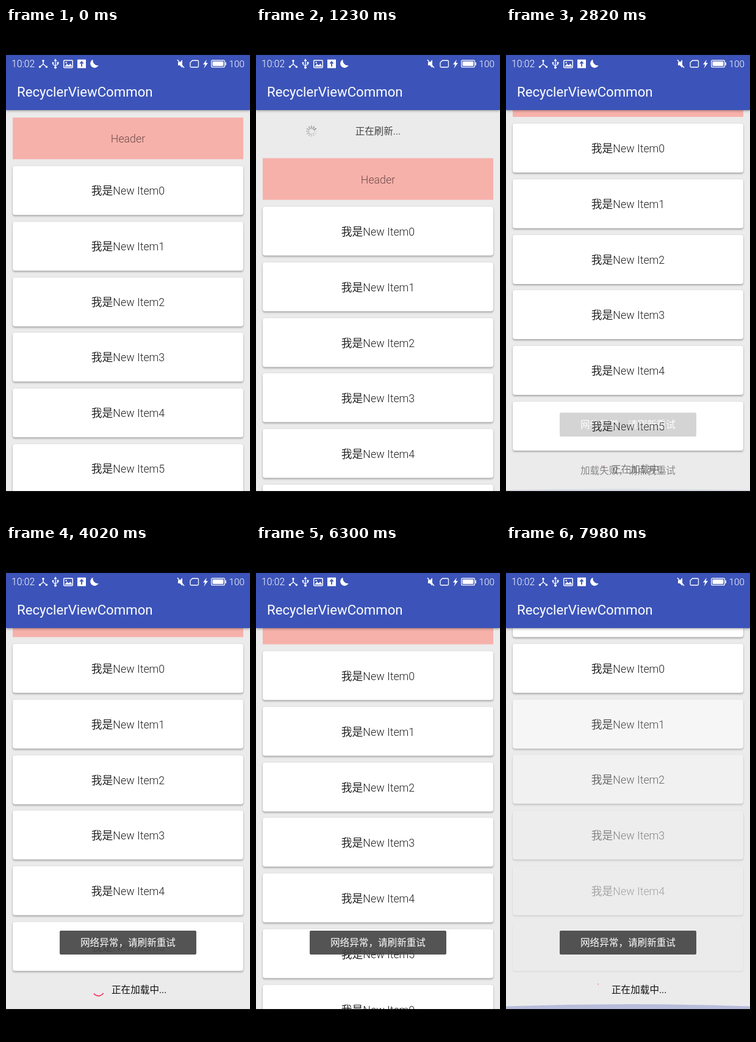
An HTML page that plays this animation: 400x800 px, repeating every 8000 ms.

```html
<!DOCTYPE html>
<html lang="zh-CN">
<head>
<meta charset="utf-8">
<title>RecyclerViewCommon</title>
<style>
html, body { margin: 0; width: 100%; height: 100%; overflow: hidden; background: #000; }
body { position: relative; font-family: Roboto, "Noto Sans CJK SC", "Noto Sans CJK", sans-serif; }
div, svg { position: absolute; }
#stage { left: 0; top: 0; width: 400px; height: 800px; overflow: hidden; background: #000; }
#view { top: 134px; width: 400px; height: 622px; overflow: hidden; background: #ebebeb; }
#roll { top: -134px; width: 400px; height: 800px; }
#bar { top: 44px; width: 400px; height: 90px; background: #3c54b9; box-shadow: 0 1px 4px rgba(0,0,0,.4); }
#clip { top: 44px; width: 400px; height: 712px; overflow: hidden; }
.label { height: 20px; line-height: 20px; white-space: pre; }
.mid { left: 0; width: 400px; text-align: center; }
.card { left: 11px; width: 378px; height: 80px; border-radius: 4px; background: #fff;
  box-shadow: 0 2px 3px rgba(0,0,0,.28), 0 0 2px rgba(0,0,0,.13); }
.card .label { top: 31px; left: 0; width: 378px; text-align: center; font-size: 17.8px; font-weight: 300; color: #222; }
#header { left: 11px; top: 146px; width: 377.5px; height: 68px; background: #f7b1ab; }
#toast { left: 88px; top: 628px; width: 224px; height: 39px; border-radius: 2px; background: rgba(70,70,70,.92); }
svg { left: 0; top: 0; overflow: visible; }
</style>
</head>
<body>
<div id="stage">
  <div id="view"><div id="roll">
    <div id="header"></div>
    <div id="pull">
      <svg width="400" height="200">
        <g id="arrow" fill="#b8b8b8">
          <path d="M91 86L99 94.500H95V97H87V94.500H83Z"/>
          <path d="M87 98.500h8v3h-8z" opacity=".8"/>
          <path d="M87 103h8v2.500h-8z" opacity=".6"/>
          <path d="M87 107h8v2h-8z" opacity=".4"/>
          <path d="M87 111h8v2h-8z" opacity=".2"/>
        </g>
        <g id="spokes" stroke-width="1.6" stroke-linecap="round"></g>
      </svg>
    </div>
    <div id="foot"><div id="loading">
      <svg width="400" height="20"><circle id="ring" r="9.5" fill="none" stroke="#ee406c" stroke-width="1.8" pathLength="360"/></svg>
    </div></div>
  </div></div>
  <svg id="edge" width="400" height="756"><path id="glow" fill="#3f51b5"/></svg>
  <div id="clip" style="height:98px"><div id="bar" style="top:0"></div></div>
  <div id="status">
    <svg width="400" height="80" fill="none" stroke="#fff" stroke-width="1.5">
      <path d="M61 53v6l-5 4M61 59l5 4"/>
      <g fill="#fff" stroke="none">
        <circle cx="61" cy="53.500" r="1.700"/><circle cx="55.500" cy="63.500" r="1.700"/><circle cx="66.500" cy="63.500" r="1.700"/>
        <path d="M81 50l2.500 4h-5z"/><circle cx="81" cy="64.500" r="2"/><circle cx="77" cy="57" r="1.500"/><path d="M83.500 55.500h3v3h-3z"/>
        <path d="M117 51.500h14v14h-14z"/>
        <path d="M141.500 52a7 7 0 1 0 9 9.500a8 8 0 0 1-9-9.500z" transform="translate(1 -.5)"/>
        <path d="M282 56h3l4-4v13l-4-4h-3z"/>
        <path d="M329 51.500l-6 8h3.500l-2 6.500 6.500-9h-3.500z"/>
        <rect x="338.500" y="54.500" width="18" height="7.500" rx="1"/><path d="M359.500 56h1.500v5h-1.500z"/>
      </g>
      <path d="M77 57v2.500l4 2.500M81 53v11M85 58v1.500l-4 2" stroke-width="1.200"/>
      <rect x="94.700" y="52.700" width="14.500" height="12" rx="1"/>
      <path d="M96 63l4-4.500 3 2.500 2.500-3 3 5z" fill="#fff" stroke="none"/><circle cx="98.700" cy="56.500" r="1.200" fill="#fff" stroke="none"/>
      <path d="M124 63v-7M121.300 58l2.700-3 2.700 3" stroke="#3c54b9" stroke-width="1.800"/>
      <path d="M281 52l11 13"/>
      <path d="M305.500 53h8.500q1.500 0 1.500 1.500v8q0 1.500-1.500 1.500h-10.500q-1.500 0-1.500-1.500v-6z" stroke-width="1.300"/>
      <rect x="336.700" y="52.700" width="21.800" height="11.200" rx="2" stroke-width="1.200"/>
    </svg>
  </div>
  <div id="toast"></div>
</div>
<script>
const LOOP = 8000, PITCH = 90.8, BATCH = 6, SPOKES = 12;
const $ = id => document.getElementById(id);

function label(parent, text, x, y, size, color, weight = 400) {
  const el = document.createElement('div');
  el.className = x === null ? 'label mid' : 'label';
  el.textContent = text;
  Object.assign(el.style, { top: y - 10 + 'px', fontSize: size + 'px', color, fontWeight: weight });
  if (x !== null) el.style.left = x + 'px';
  parent.append(el);
  return el;
}

label($('status'), '10:02', 9, 58.5, 15.8, '#fff', 300);
label($('status'), '100', 365.5, 58.5, 15.4, '#fff', 300);
label($('status'), 'RecyclerViewCommon', 18, 104, 22.2, '#fff');

const headText = label($('header'), 'Header', null, 35, 17.8, '#6f4a48', 300);
headText.style.width = '378px';
const pullText = label($('pull'), '', null, 91, 15.5, '#444');
const pullTime = label($('pull'), '最近更新 : 10:02', null, 113, 13.4, '#444');
label($('loading'), '正在加载中...', 173, 790.3, 15.6, '#111');
const failed = label($('foot'), '加载失败，请点我重试', null, 792, 15.6, '#222');
const toastText = label($('toast'), '网络异常，请刷新重试', null, 20, 15.6, '#fff');
toastText.style.width = '224px';

const cards = Array.from({ length: BATCH * 2 }, (_, i) => {
  const el = document.createElement('div');
  el.className = 'card';
  el.style.top = 225 + i * PITCH + 'px';
  label(el, '我是New Item' + i % BATCH, null, 0, 17.8, '').removeAttribute('style');
  $('roll').append(el);
  return el;
});

const spokes = Array.from({ length: SPOKES }, (_, i) => {
  const line = document.createElementNS('http://www.w3.org/2000/svg', 'path');
  line.setAttribute('d', 'M0-4.5V-8.5');
  line.setAttribute('stroke', '#777');
  line.setAttribute('transform', `translate(91 102) rotate(${i * 360 / SPOKES})`);
  $('spokes').append(line);
  return line;
});

// Keys are [time, value, ease-out power].
const scrollKeys = [
  [0, 0], [720, 113, 1.5], [840, 113], [1110, 66.5, 2.5], [1900, 66.5], [2200, 0, 2],
  [2280, 0], [2500, -65.3, 1.3], [2700, -65.3], [2760, -68.9], [3600, -68.9], [3700, -65.3],
  [6030, -65.3], [6650, -48, 2], [7350, -48], [7440, -64], [7500, -110], [7850, -480], [7950, -610.3]
];
const loadKeys = [[2700, 1], [2950, 0], [3600, 0], [3850, 1], [5400, 1], [5560, 0], [7350, 0], [7380, 1]];
const failKeys = [[2700, 0], [2950, 1], [3600, 1], [3850, 0]];
const glowKeys = [[2480, 0], [2560, .8], [2820, .4], [3080, 0], [7930, 0], [7980, 1]];
// Spinner runs: [visible from, start, turn in degrees].
const spins = [[0, 1367, -198], [3500, 2394, -161], [7000, 7920, -20]];

const clamp = v => Math.max(0, Math.min(1, v));
const smooth = v => { v = clamp(v); return v * v * (3 - 2 * v); };
const mod = (a, b) => ((a % b) + b) % b;

function at(keys, t) {
  const i = keys.findIndex(k => k[0] > t);
  if (i < 0) return keys[keys.length - 1][1];
  if (!i) return keys[0][1];
  const [t0, a] = keys[i - 1], [t1, b, power = 1] = keys[i];
  return a + (b - a) * (1 - Math.pow(1 - (t - t0) / (t1 - t0), power));
}

function cardAlpha(i, t) {
  if (i < BATCH) return 1;
  return i === BATCH ? clamp((t - 5400) / 400) : clamp((t - 7500 - (i - 7) * 90) / 600);
}

function drawRing(t) {
  const [, start, turn] = spins.filter(s => t >= s[0]).pop();
  const age = t - start, u = mod(age, 1333) / 1333;
  const tail = 270 * smooth(u * 2 - 1), head = 270 * smooth(u * 2);
  const angle = -90 + turn + age * 720 / 4444 + u * 90 + tail;
  const len = Math.max(4, head - tail);
  $('ring').setAttribute('stroke-dasharray', `${len} ${360 - len}`);
  $('ring').setAttribute('transform', `translate(151.7 790.3) rotate(${angle})`);
}

function drawPull(t, offset) {
  const busy = t >= 840 && t < 1900, pulling = t < 840;
  $('pull').style.visibility = offset > 0 ? 'visible' : 'hidden';
  pullText.textContent = busy ? '正在刷新...' : !pulling ? '刷新完成' : offset > 66.5 ? '释放刷新' : '下拉刷新';
  pullText.style.top = pulling ? '81px' : '92px';
  pullTime.style.display = $('arrow').style.display = pulling ? '' : 'none';
  $('spokes').style.display = busy ? '' : 'none';
  $('arrow').setAttribute('transform', `rotate(${180 * (1 - smooth((offset - 62) / 12))} 91 101)`);
  const step = Math.floor(t / 80);
  spokes.forEach((s, i) => s.setAttribute('opacity', .15 + .7 * mod(i - step, SPOKES) / SPOKES));
}

function draw(t) {
  const offset = at(scrollKeys, t);
  $('roll').style.transform = `translateY(${offset}px)`;
  drawPull(t, offset);

  cards.forEach((el, i) => {
    const a = cardAlpha(i, t);
    el.style.opacity = a;
    el.style.background = `rgba(255,255,255,${a * a})`;
  });

  $('foot').style.transform = `translateY(${t > 5600 ? BATCH * PITCH : 0}px)`;
  $('loading').style.opacity = at(loadKeys, t);
  failed.style.opacity = at(failKeys, t);
  drawRing(t);

  const g = at(glowKeys, t);
  $('glow').setAttribute('d', `M0 756V${756 - 4.5 * g}Q200 ${756 - 11.5 * g} 400 ${756 - 4.5 * g}V756Z`);
  $('glow').setAttribute('opacity', .3 * g);
  $('toast').style.opacity = clamp((t - 2710) / 440);
}

const begin = performance.now();
function tick(now) {
  draw(Math.max(0, now - begin) % LOOP);
  requestAnimationFrame(tick);
}
draw(0);
requestAnimationFrame(tick);
</script>
</body>
</html>
```
